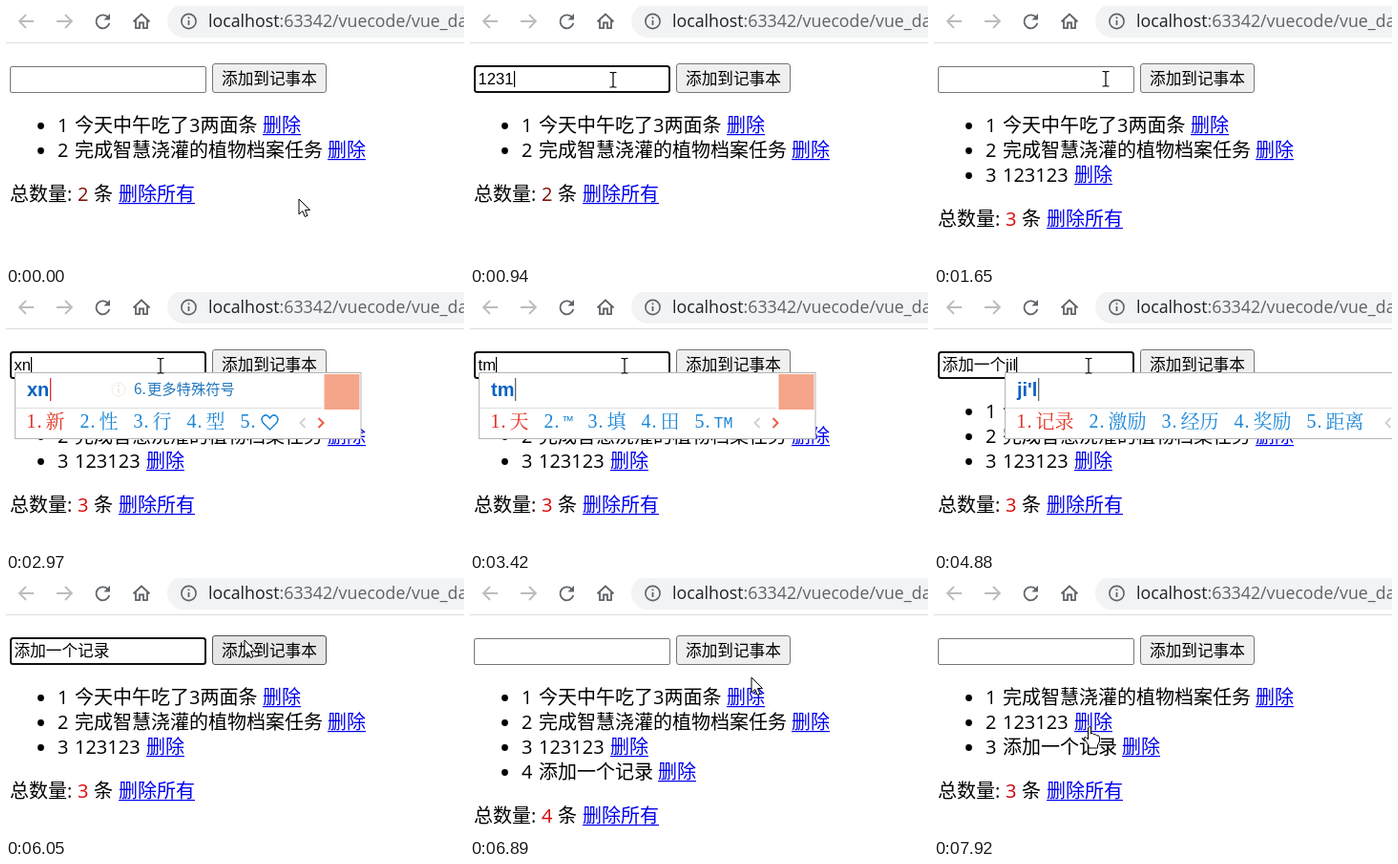
These frames come from a looping animation (480x270 px, 8 s). An HTML page:

```html
<!DOCTYPE html>
<html lang="zh-CN">
<head>
<meta charset="utf-8">
<style>
html, body { margin: 0; width: 100%; height: 100%; overflow: hidden; background: #fff; }
svg { display: block; width: 480px; height: 270px; }
text { font: 20px 'Open Sans', 'Noto Sans CJK SC', 'Noto Sans CJK', sans-serif; white-space: pre; }
.url { font-size: 17.8px; }
.ctl { font: 16.67px 'Liberation Sans', 'Noto Sans CJK SC', 'Noto Sans CJK', sans-serif; }
.pre { font: bold 20px 'Liberation Sans', sans-serif; }
.num { font: 20px 'Liberation Serif', serif; }
.mono { font: 16.67px 'Liberation Mono', monospace; }
.cand { font: 300 20px 'Noto Serif CJK SC', 'Noto Sans CJK SC', 'Noto Sans CJK', serif; }
.more { font: 15.3px 'Noto Sans CJK SC', 'Noto Sans CJK', sans-serif; }
</style>
</head>
<body>
<svg viewBox="0 0 480 270">
  <rect width="480" height="270" fill="#fff"/>
  <rect y="38" width="480" height="1" fill="#d9dbde"/>
  <rect x="169" y="-2" width="340" height="35" rx="17.5" fill="#f1f3f4"/>
  <g fill="none" stroke-width="1.8">
    <path d="M29 16H14M21 9L14 16L21 23M53 16H69M62 9L69 16L62 23" stroke="#babcbe"/>
    <path d="M107 12A7 7 0 1 0 108.300 18" stroke="#5f6368"/>
    <path d="M133.500 16.500L142 8.500L150.500 16.500M136 15V23.200H140V17.500H144V23.200H148V15" stroke="#5f6368"/>
    <circle cx="191.500" cy="16" r="7.600" stroke="#5f6368" stroke-width="1.600"/>
    <path d="M191.500 15V20M191.500 11.600V13.300" stroke="#5f6368"/>
  </g>
  <path d="M109 8V14.500H102.500Z" fill="#5f6368"/>
  <text class="url" x="212" y="22" fill="#5f6368"><tspan fill="#202124">localhost</tspan>:63342/vuecode/vue_data</text>
  <g id="view"></g>
</svg>
<script>
const LOOP = 8000;
const BLUE = '#0000ee';
const view = document.getElementById('view');

const text = (x, y, s, fill = '#000', cls = '') => `<text class="${cls}" x="${x}" y="${y}" fill="${fill}">${s}</text>`;
const box = (x, y, w, h, attrs) => `<rect x="${x}" y="${y}" width="${w}" height="${h}" ${attrs}/>`;
const line = (d, stroke, w = 1) => `<path d="${d}" fill="none" stroke="${stroke}" stroke-width="${w}"/>`;
const link = (x, y, s) => text(x, y, s, BLUE) + box(x, y + 2, s.length * 20, 1.2, `fill="${BLUE}"`);
const at = (list, t) => list.filter(k => k[0] <= t).pop();

const NOON = '今天中午吃了3两面条', FILES = '完成智慧浇灌的植物档案任务';
const LISTS = [
  [0, [NOON, FILES], '#801000'],
  [1410, [NOON, FILES, '123123'], '#dc0808'],
  [6350, [NOON, FILES, '123123', '添加一个记录'], '#d00808'],
  [7370, [FILES, '123123', '添加一个记录'], '#c8000c']
];

// time, committed text, letters being composed, candidates
const TYPING = [
  [0, ''], [620, '1'], [770, '12'], [850, '123'], [940, '1231'], [1090, '12312'], [1160, '123123'],
  [1410, ''], [1950, ''], [2340, 'x'],
  [2420, '', 'x', '下 想 向 小 新'],
  [2570, '', 'xn', '新 性 行 型 ♡'],
  [3120, '', 'x', '下 想 向 小 新'],
  [3200, ''],
  [3270, '', 't', '他 她 天 图 听'],
  [3420, '', 'tm', '天 ™ 填 田 TM'],
  [3570, '', 'tmj', '添加 天津 推荐 条件 提交'],
  [3640, '', 'tmji', '天机 天际 添加 天籍 田鸡'],
  [3720, '', 'tmjia', '添加 天价 田家 天佳 田佳'],
  [3890, '添加'],
  [3970, '添加', 'y', '一 有 也 要 用'],
  [4120, '添加', 'yi', '一 以 已 亿 意'],
  [4200, '添加', "yi'g", '一个 一共 一根 一股 一格'],
  [4270, '添加', "yi'ge", '一个 一格 一哥 毅哥 义哥'],
  [4500, '添加一个'],
  [4580, '添加一个', 'j', '就 级 将 叫 家'],
  [4730, '添加一个', 'ji', '及 几 级 记 机'],
  [4880, '添加一个', "ji'l", '记录 激励 经历 奖励 距离'],
  [4960, '添加一个记录'],
  [6350, '']
];

const PATH = [
  [0, 307, 202], [150, 285, 170], [375, 165, 84], [525, 150, 77], [1050, 150, 77], [1200, 258, 75],
  [1425, 256, 73], [1650, 180, 76], [1950, 162, 77], [5475, 162, 77], [5775, 196, 3],
  [6000, 250, 65], [6225, 262, 74], [6375, 262, 76], [6600, 284, 98], [6975, 303, 108],
  [7200, 302, 126], [7425, 300, 126], [7725, 163, 157], [7875, 163, 155], [LOOP, 163, 155]
];

const WIDTH = { x: .5, t: .278, y: .5, j: .222, i: .222, l: .222, m: .833, "'": .191 };
const measure = (s, size) => [...s].reduce((w, c) =>
  w + size * (c > '\u2fff' ? 1 : WIDTH[c] || .556), 0);
const bold = s => [...s].reduce((w, c) =>
  w + 20 * ({ x: .556, y: .556, e: .556, a: .556, t: .333, m: .889, i: .278, j: .278, l: .278, "'": .238 }[c] || .611), 0);

function pointer(t) {
  const q = Math.floor((t + 8) / 75) * 75;
  const i = Math.max(1, PATH.findIndex(k => k[0] >= q));
  const [t0, x0, y0] = PATH[i - 1], [t1, x1, y1] = PATH[i];
  const k = (q - t0) / (t1 - t0);
  return [Math.round(x0 + (x1 - x0) * k), Math.round(y0 + (y1 - y0) * k)];
}
const inside = ([px, py], x, y, w, h) => px >= x && px <= x + w && py >= y && py <= y + h;

function drawList(items, color) {
  let out = '';
  items.forEach((s, i) => {
    const y = 132 + i * 26;
    const w = [...s].reduce((a, c) => a + (c > '\u2fff' ? 20 : 11.6), 0);
    out += `<circle cx="36.5" cy="${y - 6.5}" r="3.4"/>` + text(54, y, i + 1) + text(72, y, s) +
      link(Math.round(77.3 + w), y, '删除');
  });
  const y = 152 + items.length * 26;
  return out + text(4, y, '总数量:') + text(75, y, items.length, color) + text(92, y, '条') + link(118, y, '删除所有');
}

function drawPopup(left, pre, cands) {
  let x = left + 12.5, row = '';
  cands.split(' ').forEach((c, i) => {
    const fill = i ? '#1b86d6' : '#e2301f';
    row += text(x, 142, i + 1, fill, 'num') + text(x + 11, 142, '.', fill, 'num');
    const w = c === '™' ? 10 : c === 'TM' || c === '♡' ? 20 : c.length * 20;
    if (c === '♡') row += line(`M${x + 31} 144l-7 -7q-3 -4 0 -7q4 -3 7 2q3 -5 7 -2q3 3 0 7z`, fill, 1.5);
    else row += text(x + 20, c > '\u2fff' ? 143 : 142, c, fill, c > '\u2fff' ? 'cand' : 'mono');
    x += 20 + w + 16;
  });
  const right = x - 16 + 87;
  let out = box(left + .5, 84.5, right - left - 1, 69, 'fill="#fff" stroke="#b4b4b4"') +
    line(`M${left + 1} 121.500H${right - 41}`, '#dedede') + row;
  out += text(left + 13, 109, pre, '#0b62c2', 'pre');
  out += box(Math.round(left + 14 + bold(pre)), 90, 1.3, 24, `fill="${pre === 'xn' ? '#e03030' : '#666'}"`);
  if (pre === 'xn') {
    out += '<circle cx="118" cy="102" r="7" fill="none" stroke="#f6e9e2"/>' + line('M118 101V106M118 97V99', '#f3ddd2', 1.4);
    out += text(134, 107, '6.', '#2277bd', 'more') + text(148, 107, '更多特殊符号', '#2277bd', 'more');
  }
  out += line(`M${right - 59} 132l-5 5l5 5`, '#cfcfcf', 1.8) + line(`M${right - 45} 132l5 5l-5 5`, '#ee5a45', 2);
  return out + box(right - 39, 86, 37, 37, 'fill="#f5a58a"');
}

function drawPointer(p, items) {
  const [x, y] = p;
  const last = items.length === 4 ? [269, 115] : [148, 141];
  const overLink = inside(p, 269, 115, 40, 22) && items[0] === NOON || inside(p, last[0], last[1], 40, 24) && items[0] === FILES;
  let d = 'M0 0V16L3.800 12.500L6.300 18.500L9 17.300L6.500 11.600H11.500Z';
  if (inside(p, 4, 62, 206, 29))
    return line(`M${x - 3.500} ${y - 7.500}h2.500l1 1l1 -1h2.500M${x} ${y - 7}v14.500M${x - 3.500} ${y + 8}h2.500l1 -1l1 1h2.500`, '#000', 1.2);
  if (overLink)
    d = 'M-1.500 1.500Q0 -.500 1.500 1.500V8Q3.500 6.500 4.500 8.800Q6.500 7.800 7.500 10Q10 9 10.500 11.500V16L8.500 20V23H-1V20L-5.500 13.500Q-6 11 -3.500 11.800L-1.500 14Z';
  return `<path transform="translate(${x} ${y})" d="${d}" fill="#fff" stroke="#000" stroke-linejoin="round"/>`;
}

let shown = '';
function draw(t) {
  const [, items, color] = at(LISTS, t);
  const [since, done, pre = '', cands] = at(TYPING, t);
  const focus = t >= 520 && t < 1410 || t >= 1950 && t < 6290;
  const p = pointer(t), hover = inside(p, 216, 60, 120, 31);
  const value = done + pre.replace("'", '');

  let out = focus
    ? box(5, 63, 204, 27, 'rx="2.500" fill="#fff" stroke="#101010" stroke-width="2"')
    : box(4.5, 63.5, 205, 27, 'rx="1.500" fill="#fff" stroke="#767676"');
  out += box(216.5, 60.5, 119, 30, `rx="2.500" fill="${hover ? '#e5e5e5' : '#efefef'}" stroke="${hover ? '#4f4f4f' : '#767676'}"`);
  out += text(226, 82, '添加到记事本', '#000', 'ctl') + text(8.5, 82, value, '#000', 'ctl');
  if (focus && (pre || t - since < 530))
    out += box(Math.round(8.5 + measure(value, 16.67)), 68, 1.2, 17, '');
  out += drawList(items, color);
  if (pre) out += drawPopup(Math.round(9 + done.length * 16.3), pre, cands);
  out += drawPointer(p, items);
  if (out !== shown) view.innerHTML = shown = out;
}

function tick() {
  draw(performance.now() % LOOP);
  requestAnimationFrame(tick);
}
tick();
</script>
</body>
</html>
```
